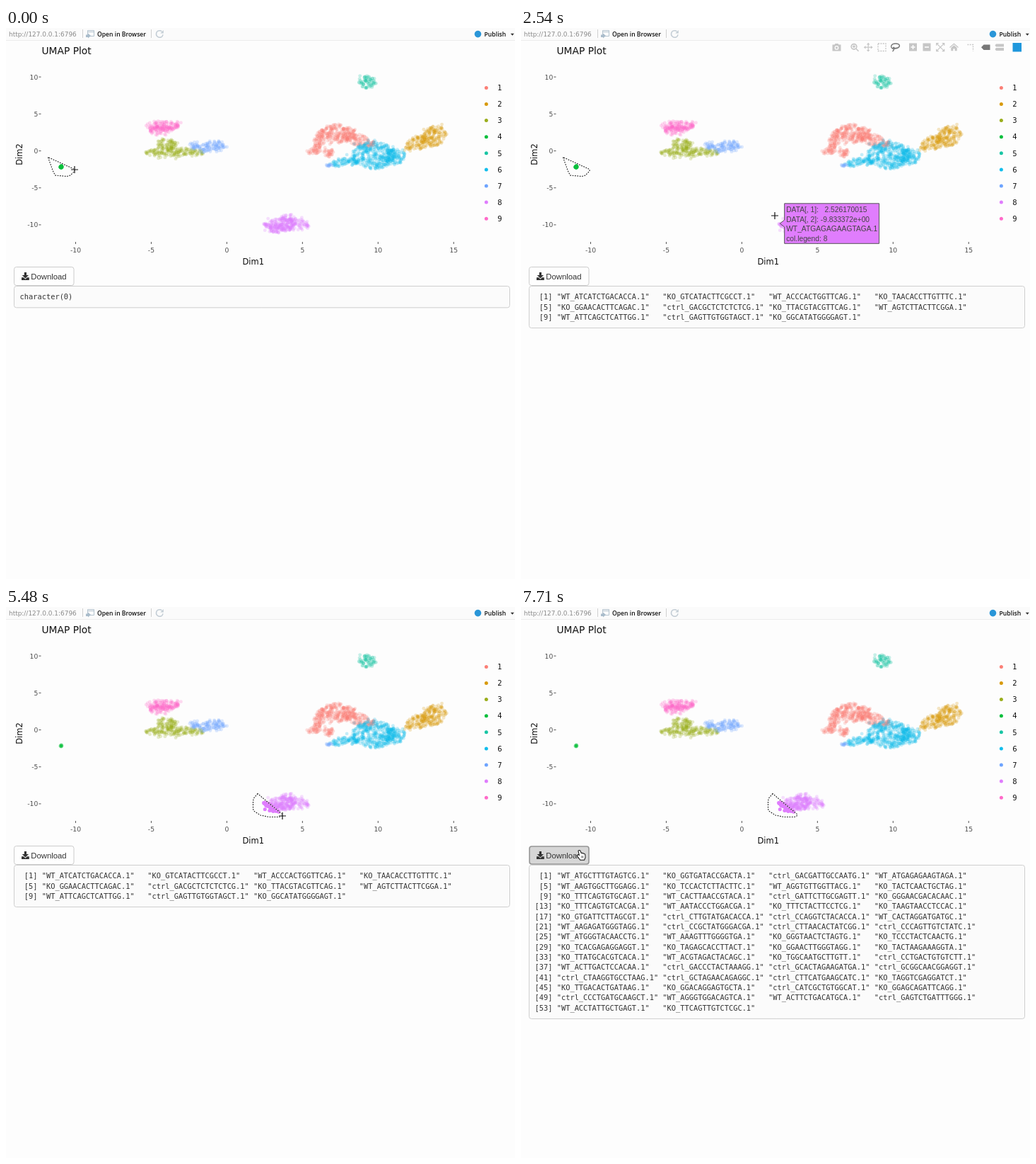
These frames come from a looping animation (720 px wide and 778 px high, 8000 ms). An HTML page with a canvas:

```html
<!DOCTYPE html>
<html lang="en">
<head>
<meta charset="utf-8">
<title>UMAP Plot</title>
<style>
html, body { margin: 0; width: 100%; height: 100%; overflow: hidden; background: #fdfdfd; }
canvas { display: block; width: 720px; height: 778px; }
</style>
</head>
<body>
<canvas id="stage"></canvas>
<script>
const W = 720, H = 778, LOOP = 8000;
const SANS = '"DejaVu Sans", Verdana, sans-serif';
const MONO = '"DejaVu Sans Mono", monospace';
const ARIAL = '"Liberation Sans", Arial, sans-serif';
const UI = '"Open Sans", sans-serif';
const COLORS = ['#fb7f76', '#d89a0c', '#9aae1c', '#08bf3c', '#18c5a4', '#10bdec', '#6ea4ff', '#df7dfd', '#ff6ac9'];

const dpr = window.devicePixelRatio || 1;
const stage = document.getElementById('stage');
stage.width = W * dpr;
stage.height = H * dpr;
let ctx = stage.getContext('2d');

// Pointer path: [ms, x, y]
const PATH = [
  [0, 97, 200], [1350, 97, 200], [1650, 127, 238], [1800, 127, 238], [1950, 217, 256],
  [2097, 275, 264], [2391, 356, 268], [2538, 359, 265], [3126, 355, 264], [3567, 350, 276],
  [4302, 362, 295], [4743, 375, 297], [5331, 391, 295], [6801, 391, 295], [6948, 283, 312],
  [7242, 165, 338], [7536, 92, 351], [7683, 85, 350]
];
const OLD_LASSO = [[59.5, 182.5], [66, 201], [69.5, 208], [86, 209.5], [91, 208], [97, 202], [97, 199.5]];
// [ms, x, y]: each corner appears at its time
const NEW_LASSO = [
  [3130, 356, 263.5], [3420, 350.5, 270], [3570, 349.5, 274], [3860, 349.5, 285], [4010, 350.5, 288],
  [4300, 356, 291.5], [4450, 360, 294], [4740, 372, 296.5], [5190, 387, 296.5], [5330, 390, 295], [5480, 391, 293]
];

function seeded(seed) {
  return () => {
    seed = (seed + 0x6D2B79F5) | 0;
    let v = Math.imul(seed ^ seed >>> 15, 1 | seed);
    v = v + Math.imul(v ^ v >>> 7, 61 | v) ^ v;
    return ((v ^ v >>> 14) >>> 0) / 4294967296;
  };
}
const rnd = seeded(27);
const points = [];

// Fills a tilted ellipse evenly, with a few stray points around it.
function blob(color, cx, cy, rx, ry, tilt = 0) {
  const count = Math.max(11, Math.round(Math.PI * rx * ry * 0.18));
  const c = Math.cos(tilt), s = Math.sin(tilt);
  for (let i = 0; i < count; i++) {
    const a = rnd() * 2 * Math.PI;
    const r = Math.sqrt(rnd()) * (rx > 12 && rnd() < 0.07 ? 1.25 : 1);
    const u = rx * r * Math.cos(a), v = ry * r * Math.sin(a);
    points.push({ x: cx + u * c - v * s, y: cy + u * s + v * c, color });
  }
}
blob(0, 470, 149, 27, 13);
blob(0, 443, 161, 8, 17, 0.25);
blob(0, 498, 158, 24, 8, 0.25);
blob(0, 434, 174, 9, 4);
blob(0, 456, 174, 7, 8);
blob(1, 605, 153, 18, 14, -0.5);
blob(1, 581, 163, 17, 10, -0.35);
blob(2, 238, 176, 42, 7);
blob(2, 227, 164, 14, 9);
blob(3, 78, 196, 1.3, 1.3);
blob(4, 511, 76, 13, 9);
blob(5, 520, 180, 31, 19);
blob(5, 479, 190, 22, 6, -0.15);
blob(5, 550, 180, 15, 13);
blob(6, 292, 168, 20, 8, -0.2);
blob(6, 457, 194, 5, 1.5);
blob(6, 267, 166, 8, 6);
blob(7, 398, 277, 33, 9);
blob(7, 398, 272, 12, 10);
blob(7, 386, 283, 18, 7);
blob(8, 222, 138, 24, 7);
blob(8, 219, 144, 17, 8);

const FIRST = `WT_ATCATCTGACACCA KO_GTCATACTTCGCCT WT_ACCCACTGGTTCAG KO_TAACACCTTGTTTC
KO_GGAACACTTCAGAC ctrl_GACGCTCTCTCTCG KO_TTACGTACGTTCAG WT_AGTCTTACTTCGGA
WT_ATTCAGCTCATTGG ctrl_GAGTTGTGGTAGCT KO_GGCATATGGGGAGT`;
const SECOND = `WT_ATGCTTTGTAGTCG KO_GGTGATACCGACTA ctrl_GACGATTGCCAATG WT_ATGAGAGAAGTAGA
WT_AAGTGGCTTGGAGG KO_TCCACTCTTACTTC WT_AGGTGTTGGTTACG KO_TACTCAACTGCTAG
KO_TTTCAGTGTGCAGT WT_CACTTAACCGTACA ctrl_GATTCTTGCGAGTT KO_GGGAACGACACAAC
KO_TTTCAGTGTCACGA WT_AATACCCTGGACGA KO_TTTCTACTTCCTCG KO_TAAGTAACCTCCAC
KO_GTGATTCTTAGCGT ctrl_CTTGTATGACACCA ctrl_CCAGGTCTACACCA WT_CACTAGGATGATGC
WT_AAGAGATGGGTAGG ctrl_CCGCTATGGGACGA ctrl_CTTAACACTATCGG ctrl_CCCAGTTGTCTATC
WT_ATGGGTACAACCTG WT_AAAGTTTGGGGTGA KO_GGGTAACTCTAGTG KO_TCCCTACTCAACTG
KO_TCACGAGAGGAGGT KO_TAGAGCACCTTACT KO_GGAACTTGGGTAGG KO_TACTAAGAAAGGTA
KO_TTATGCACGTCACA WT_ACGTAGACTACAGC KO_TGGCAATGCTTGTT ctrl_CCTGACTGTGTCTT
WT_ACTTGACTCCACAA ctrl_GACCCTACTAAAGG ctrl_GCACTAGAAGATGA ctrl_GCGGCAACGGAGGT
ctrl_CTAAGGTGCCTAAG ctrl_GCTAGAACAGAGGC ctrl_CTTCATGAAGCATC KO_TAGGTCGAGGATCT
KO_TTGACACTGATAAG KO_GGACAGGAGTGCTA ctrl_CATCGCTGTGGCAT KO_GGAGCAGATTCAGG
ctrl_CCCTGATGCAAGCT WT_AGGGTGGACAGTCA WT_ACTTCTGACATGCA ctrl_GAGTCTGATTTGGG
WT_ACCTATTGCTGAGT KO_TTCAGTTGTCTCGC`;

const listing = text => text.split('\n').map((row, i) =>
  `[${i * 4 + 1}]`.padStart(4) + ' ' + row.split(' ').map(id => `"${id}.1"`.padEnd(23)).join(' '));
const EMPTY = ['character(0)'], firstRows = listing(FIRST), secondRows = listing(SECOND);

function inside(poly, x, y) {
  let hit = false;
  for (let i = 0, j = poly.length - 1; i < poly.length; j = i++) {
    const [ax, ay] = poly[i], [bx, by] = poly[j];
    if (ay > y !== by > y && x < (bx - ax) * (y - ay) / (by - ay) + ax) hit = !hit;
  }
  return hit;
}

function text(s, x, y, size, family, color, align = 'left', weight = 400) {
  ctx.font = `${weight} ${size}px ${family}`;
  ctx.fillStyle = color;
  ctx.textAlign = align;
  ctx.fillText(s, x, y);
}

function rect(x, y, w, h, color) {
  ctx.fillStyle = color;
  ctx.fillRect(x, y, w, h);
}

function dot(x, y, r, color) {
  ctx.fillStyle = color;
  ctx.beginPath();
  ctx.arc(x, y, r, 0, 7);
  ctx.fill();
}

function stroke(d, color, width, dash = []) {
  ctx.setLineDash(dash);
  ctx.strokeStyle = color;
  ctx.lineWidth = width;
  ctx.stroke(new Path2D(d));
  ctx.setLineDash([]);
}

function fill(d, color) {
  ctx.fillStyle = color;
  ctx.fill(new Path2D(d), 'evenodd');
}

function box(x, y, w, h, bg, border, width = 1) {
  ctx.beginPath();
  ctx.roundRect(x, y, w, h, 3.2);
  ctx.fillStyle = bg;
  ctx.fill();
  ctx.strokeStyle = border;
  ctx.lineWidth = width;
  ctx.stroke();
}

function header() {
  rect(0, 0, W, 17, '#fbfbfb');
  rect(0, 17, W, 1, '#ececec');
  text('http://127.0.0.1:6796', 4, 11.5, 8.95, SANS, '#8a8a8a');
  rect(108, 2, 1, 12, '#d0d0d0');
  rect(205, 2, 1, 12, '#d0d0d0');
  stroke('M115.5 3.5h9v8h-9zM115.5 5.5h9', '#b4c3cf', 1);
  fill('M113 13V9.5h3v-2l4 3.5-4 3.5v-1.5z', '#a9bccb');
  text('Open in Browser', 129, 11.5, 8.6, UI, '#111', 'left', 600);
  ctx.beginPath();
  ctx.arc(217.3, 8.5, 4.8, 0.2, 5.4);
  ctx.strokeStyle = '#c3cdd5';
  ctx.lineWidth = 1.6;
  ctx.stroke();
  fill('M222.8 3v4.5h-4.5z', '#c3cdd5');
  dot(667.5, 8.6, 4.8, '#2a96d8');
  text('Publish', 676.5, 11.8, 8.7, UI, '#111', 'left', 600);
  fill('M713.8 7.8h5l-2.5 3z', '#333');
}

function axes() {
  text('UMAP Plot', 50.5, 36.7, 13.8, SANS, '#111');
  for (let v = -10; v <= 15; v += 5) {
    const x = 312.4 + v * 21.39, y = 173.5 - v * 10.44;
    rect(x - 0.5, 302, 1, 3, '#555');
    text(v, x, 317.3, 9.2, SANS, '#4d4d4d', 'center');
    if (v > 10) continue;
    rect(46.5, y - 0.5, 3, 1, '#555');
    text(v, 45.3, y + 3.4, 9.2, SANS, '#4d4d4d', 'right');
  }
  text('Dim1', 349.8, 334.3, 11.5, SANS, '#111', 'center');
  ctx.save();
  ctx.translate(23, 178.5);
  ctx.rotate(-Math.PI / 2);
  text('Dim2', 0, 0, 11.5, SANS, '#111', 'center');
  ctx.restore();
  COLORS.forEach((color, i) => {
    const y = 84.4 + i * 23.1;
    dot(679.4, y, 2.5, color);
    text(i + 1, 695.3, y + 3.7, 10, SANS, '#111');
  });
}

// Everything that never changes is drawn once.
function backdrop() {
  const layer = document.createElement('canvas');
  layer.width = stage.width;
  layer.height = stage.height;
  const main = ctx;
  ctx = layer.getContext('2d');
  ctx.scale(dpr, dpr);
  rect(0, 0, W, H, '#fdfdfd');
  header();
  axes();
  ctx.globalAlpha = 0.24;
  points.sort((a, b) => a.color - b.color);
  for (const p of points) dot(p.x, p.y, 2.45, COLORS[p.color]);
  ctx = main;
  return layer;
}

function at(x, y, paint) {
  ctx.save();
  ctx.translate(x, y);
  paint();
  ctx.restore();
}

function modebar(alpha) {
  if (!alpha) return;
  const pale = '#c6c6c6', dark = '#777', paper = '#fdfdfd';
  ctx.save();
  ctx.globalAlpha = alpha;
  at(446.5, 27.5, () => {
    fill('M-6-4h3l1-1.500h4l1 1.500h3v9h-12z', pale);
    dot(0, 0.4, 2.9, paper);
    dot(0, 0.4, 1.6, pale);
  });
  at(471, 26.3, () => {
    dot(0, 0, 4.6, pale);
    dot(0, 0, 2.9, paper);
    stroke('M3 3L6.500 6.500M-2 0H2M0-2V2', pale, 1.6);
  });
  for (let i = 0; i < 4; i++) at(491.2, 27.2, () => {
    ctx.rotate(i * Math.PI / 2);
    stroke('M0 0V-5', pale, 1.2);
    fill('M0-6.400l2.300 2.700h-4.600z', pale);
  });
  stroke('M505 22h11v10.500h-11z', pale, 1.3, [2, 1.4]);
  stroke('M526.500 29.500C521 27 524 22 530 22S537 26 533 28S525 28.500 527 27.500S527.500 32 525.500 33', dark, 1.4);
  rect(549, 21.5, 11, 11, pale);
  rect(551.5, 26.2, 6, 1.6, paper);
  rect(553.7, 24, 1.6, 6, paper);
  rect(568.5, 21.5, 11, 11, pale);
  rect(571, 26.2, 6, 1.6, paper);
  for (let i = 0; i < 4; i++) at(593.2, 27.2, () => {
    ctx.rotate(i * Math.PI / 2);
    stroke('M0 0L5-5M2.500-5.500H5.500V-2.500', pale, 1.2);
  });
  stroke('M606.500 27.500l6-5.300 6 5.300', pale, 1.2);
  fill('M612.500 24.200l4.200 3.700v4.300h-3v-3h-2.400v3h-3v-4.300z', pale);
  stroke('M631.500 23.500h8v9', pale, 1.5, [1.8, 1.5]);
  fill('M651 27.200l3.500-3.700h9v7.400h-9z', dark);
  for (const y of [22.5, 28]) fill(`M670.500 ${y + 2}l1.500-2h11v4h-11z`, pale);
  rect(695.5, 21, 12.5, 12.5, '#1f97dc');
  ctx.restore();
}

function barAlpha(t) {
  const fade = start => t < start + 150 ? 0.4 : t < start + 590 ? 0.85 : 1;
  if (t < 600 || (t >= 3130 && t < 6080) || t >= 7400) return 0;
  if (t >= 7100) return t < 7250 ? 0.6 : 0.2;
  return fade(t < 3130 ? 600 : 6080);
}

function lasso(poly) {
  if (poly.length < 2) return;
  for (const p of points) if (inside(poly, p.x, p.y)) dot(p.x, p.y, 2.5, COLORS[p.color]);
  const d = 'M' + poly.map(p => p.join(' ')).join('L') + 'Z';
  stroke(d, '#fff', 1);
  stroke(d, '#111', 1.1, [1.7, 1.7]);
}

function tooltip(tipX, tipY, rows) {
  const left = tipX + 6.3, top = tipY - 28.2, h = 56.5;
  ctx.font = `10.25px ${ARIAL}`;
  const right = left + 5 + Math.max(...rows.map(r => ctx.measureText(r).width));
  const d = `M${tipX} ${tipY}L${left} ${tipY - 5}V${top}H${right}V${top + h}H${left}V${tipY + 5}Z`;
  fill(d, '#e07dfd');
  stroke(d, '#555', 1);
  rows.forEach((r, i) => text(r, left + 2.5, top + 12.3 + i * 13.55, 10.25, ARIAL, '#444'));
}

function output(rows) {
  box(11.5, 364.5, 701, 16 + rows.length * 14.35, '#fbfbfb', '#cfcfcf');
  rows.forEach((r, i) => text(r, 19.5, 383.2 + i * 14.35, 10.37, MONO, '#333'));
}

function button(hover) {
  if (hover) box(12, 338, 84, 25, '#d6d6d6', '#969696', 1.6);
  else box(11.5, 337.5, 84.5, 26, '#fefefe', '#cccccc');
  fill('M25.8 345h3.2v4h3l-4.6 4.6-4.6-4.6h3z', '#333');
  fill('M22 352.3h3l2.4 2.4 2.4-2.4h3v3.7h-10.8z', '#333');
  text('Download', 35.3, 354.5, 11.3, ARIAL, '#333');
}

function outlined(d, line, width, body) {
  stroke(d, line, width);
  fill(d, body);
}

const SHAPES = {
  cross() {
    stroke('M-5 0H5M0-5V5', 'rgba(255,255,255,.7)', 2.6);
    stroke('M-5 0H5M0-5V5', '#111', 1.2);
  },
  resize() {
    outlined('M-5.5 0l4-3.7v2.7h3v-2.7l4 3.7-4 3.7v-2.7h-3v2.7z', '#fff', 1.5, '#000');
  },
  arrow() {
    outlined('M-3-6v11l2.5-2.3 1.7 3.9 1.8-.8-1.7-3.7h3.5z', '#fff', 1.6, '#000');
  },
  hand() {
    outlined('M-3.5-5.5q1-1.2 2 0l1.5 3.7q1.2-1 2 .2q1.2-.7 1.8.4q1.3-.3 1.5 1.2l.2 3.5-1.2 3.2h-5.3l-3.7-4.7q-1-1.7.8-1.7l2 1.2z', '#111', 2, '#fff');
    stroke('M.8 1.5v2.8M2.6 1.5v2.8', '#111', 0.7);
  }
};

// The pointer moves along its path in discrete ticks.
function pointerAt(t) {
  const q = t < 1950 ? Math.floor(t / 150) * 150 : 1950 + Math.floor((t - 1944) / 147) * 147;
  const i = PATH.findIndex(p => p[0] > q);
  if (i < 0) return PATH[PATH.length - 1].slice(1);
  const [t0, x0, y0] = PATH[i - 1], [t1, x1, y1] = PATH[i];
  const k = (q - t0) / (t1 - t0);
  return [x0 + (x1 - x0) * k, y0 + (y1 - y0) * k];
}

const base = backdrop();

function draw(t) {
  ctx.setTransform(1, 0, 0, 1, 0, 0);
  ctx.drawImage(base, 0, 0);
  ctx.scale(dpr, dpr);
  const [x, y] = pointerAt(t);
  const hover = x < 96 && y > 338;
  lasso(t < 3130 ? OLD_LASSO : NEW_LASSO.filter(p => p[0] <= t).map(p => p.slice(1)));
  modebar(barAlpha(t));
  button(hover);
  output(t < 600 ? EMPTY : t < 6080 ? firstRows : secondRows);
  if (t >= 2540 && t < 3130) {
    tooltip(366.4, 276, ['DATA[, 1]:   2.526170015', 'DATA[, 2]: -9.833372e+00', 'WT_ATGAGAGAAGTAGA.1', 'col.legend: 8']);
  }
  if (t >= 6220 && t < 7100) {
    tooltip(390.6, 290.5, ['DATA[, 1]:   3.659153223', 'DATA[, 2]: -1.120096e+01', 'KO_TATTGCTGCCGTTC.1', 'col.legend: 8']);
  }
  const shape = hover ? 'hand' : y <= 305 ? 'cross' : y <= 315 ? 'resize' : 'arrow';
  at(x, y, SHAPES[shape]);
}

const start = performance.now();
function tick() {
  draw((performance.now() - start) % LOOP);
  requestAnimationFrame(tick);
}
tick();
</script>
</body>
</html>
```
